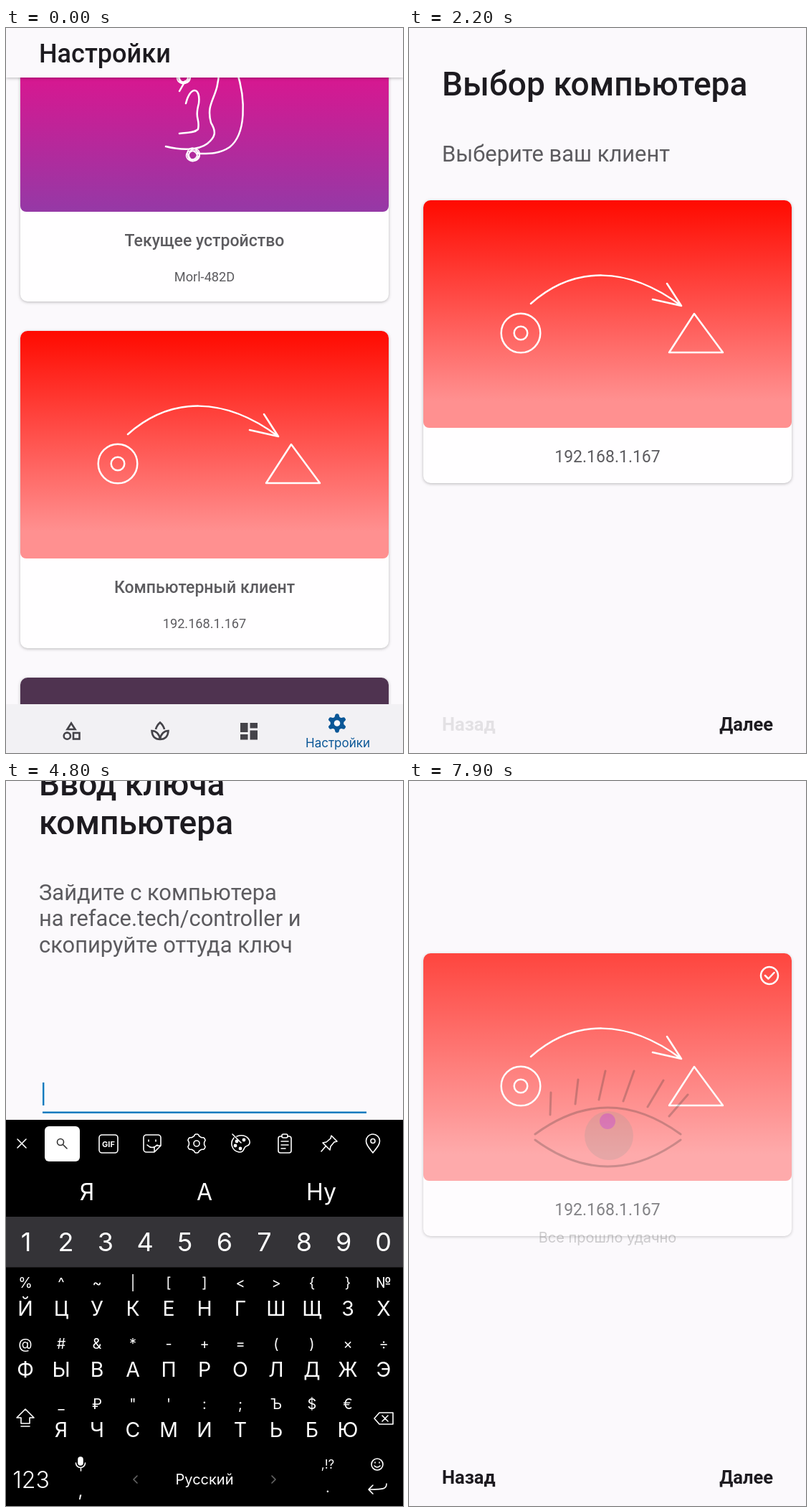
Recreate the animation shown at these times as an HTML page. Size 554 by 1010 pixels, loop 8000 ms.

```html
<!DOCTYPE html>
<html lang="ru">
<head>
<meta charset="utf-8">
<style>
html, body { margin: 0; width: 100%; height: 100%; overflow: hidden; background: #000; }
svg { display: block; width: 554px; height: 1010px; font-family: Roboto, "Noto Sans", sans-serif; }
.soft { font-family: Inter, "Noto Sans", sans-serif; }
.mid { text-anchor: middle; }
.end { text-anchor: end; }
.med { font-weight: 500; }
.bold { font-weight: 700; }
.light { font-weight: 300; }
.line { fill: none; stroke: #fff; stroke-width: 2.5; stroke-linecap: round; stroke-linejoin: round; }
.thin { stroke-width: 1.6; }
.card { filter: drop-shadow(0 1px 2px #0004); }
</style>
</head>
<body>
<script>
const text = (x, y, size, str, cls = '', fill = '#5c5b5f', more = '') =>
  `<text x="${x}" y="${y}" font-size="${size}" class="${cls}" fill="${fill}" ${more}>${str}</text>`;
const rect = (x, y, w, h, fill, r = 0, more = '') =>
  `<rect x="${x}" y="${y}" width="${w}" height="${h}" rx="${r}" fill="${fill}" ${more}/>`;
const circle = (x, y, r, more = '') => `<circle cx="${x}" cy="${y}" r="${r}" ${more}/>`;
const path = (d, more = '') => `<path d="${d}" ${more}/>`;
const group = (id, body, more = '') => `<g id="${id}" ${more}>${body}</g>`;

// Six-toothed outline shared by both settings icons
function gear(x, y, r, tooth, more) {
  let d = '';
  for (let i = 0; i < 72; i++) {
    const a = i * Math.PI / 36, q = r - tooth * Math.max(-1, Math.min(1, 1.6 * Math.cos(6 * a)));
    d += `${i ? 'L' : 'M'}${(x + q * Math.cos(a)).toFixed(1)} ${(y + q * Math.sin(a)).toFixed(1)}`;
  }
  return path(d + 'Z', more);
}

const BG = '#fbf9fc', INK = '#1d1b20', BLUE = '#0c7bbf';

const clientArt = `<g class="line">${circle(156, 185, 27.3)}${circle(156, 185, 9.3)}
  ${path('M398 158L438 212H363Z')}
  ${path('M170 144C230 91 305 91 380 147M360 116L380 147L340 138')}</g>`;

const card = (y, h, fill, body) => `<g transform="translate(0 ${y})">
  ${rect(20, 0, 514, h, '#fffeff', 10, 'class="card"')}
  ${path('M20 10a10 10 0 0 1 10-10H524a10 10 0 0 1 10 10V309a8 8 0 0 1-8 8H28a8 8 0 0 1-8-8Z', `fill="${fill}"`)}
  ${body}</g>`;

const labels = (title, sub) =>
  text(277, 365, 23, title, 'mid med') + text(277, 413.5, 18.2, sub, 'mid');

const knot = (x, y) => [0, 1, 2, 3].map(i =>
  `<ellipse cx="${x - 3 + i * 2}" cy="${y - 2 + i * 1.5}" rx="7" ry="8" transform="rotate(${i * 40} ${x} ${y})"/>`).join('');

const ear = `<g class="line" transform="translate(0 61)" stroke-width="2.2">
  ${path('M250 74L242 88M251 105C257 80 272 82 269 105C263 128 271 126 268 141C262 147 252 145 242 147')}
  ${path('M297 60C297 98 278 102 286 132C294 145 292 152 281 161C268 171 243 170 223 165')}
  ${path('M322 60C335 100 335 148 312 166C297 176 282 175 268 175')}
  <g stroke-width="1.6">${knot(250, 69)}${knot(263, 177)}</g></g>`;

const nav = rect(0, 942, 554, 73, '#f2f1f4') +
  `<g fill="none" stroke="#444349" stroke-width="2.6">
    ${path('M91 968.5L85.5 977H96.5Z')}${circle(85.3, 986.2, 4.6)}${rect(94, 982, 8.5, 8.5, 'none')}
    ${path('M215 991C214 983 209 979 203.500 979C204 987 208 991 215 991C222 991 226 987 226.500 979C221 979 216 983 215 991M209 977C210 973 212 970 215 967.500C218 970 220 973 221 977')}
  </g>` +
  path('M327 968h10.500v13h-10.500zM327 984h10.500v7.500h-10.500zM340.500 978.500h10.500v13h-10.500zM340.500 968h10.500v7.500h-10.500z', 'fill="#444349"') +
  gear(462, 968.5, 11.2, 2, 'fill="#0a5797"') + circle(462, 968.5, 4.3, `fill="${BG}"`) +
  text(463, 1002, 17, 'Настройки', 'mid soft', '#0a5797');

const settings = rect(0, 0, 554, 1050, BG) +
  card(-61, 442, 'url(#violet)', ear + labels('Текущее устройство', 'Morl-482D')) +
  card(422, 442, 'url(#red)', clientArt + labels('Компьютерный клиент', '192.168.1.167')) +
  card(905, 442, '#4f3350', '') +
  rect(0, 0, 554, 69, BG, 0, 'class="card"') +
  text(46, 48, 36, 'Настройки', 'med', INK) + nav;

const check = group('check', circle(503, 31, 12) + path('M497 31L501.500 35.500L509.500 27'), 'class="line"');

const pickPage =
  group('pickHead', text(46, 94, 46, 'Выбор компьютера', 'med', INK) +
    text(46, 185.5, 30.9, 'Выберите ваш клиент')) +
  group('pickCard', card(240, 394, 'url(#red)', clientArt + check +
    text(277, 365, 23, '192.168.1.167', 'mid')));

const keyPage = group('keyPage',
  text(46, 94, 46, 'Ввод ключа', 'med', INK) + text(46, 148, 46, 'компьютера', 'med', INK) +
  ['Зайдите с компьютера', 'на reface.tech/controller и', 'скопируйте оттуда ключ']
    .map((s, i) => text(46, 240 + 36.4 * i, 30.9, s)).join('') +
  text(51, 518, 21.7, '', 'soft', INK, 'id="typed"') +
  rect(51, 522, 0, 1.6, INK, 0, 'id="under"') +
  rect(51, 494, 2.4, 32, BLUE, 0, 'id="caret"') +
  rect(51, 534.5, 452, 1.6, '#8a888c', 0, 'id="rule"'));

const eye = group('eye', `<g fill="none" stroke="#333" stroke-width="3" stroke-linecap="round">
  ${circle(279, 494, 34, 'fill="#a09c98" stroke="none"')}
  ${path('M176 492Q277 418 379 492M176 500Q277 574 379 500')}
  ${path('M198 434L197 465M236 416L232 450M274 404L265 444M314 404L299 446M355 417L333 454M389 437L363 467')}
  ${circle(277, 474, 11, 'fill="#6a10ff" stroke="none"')}</g>` +
  text(277, 643, 20, 'Все прошло удачно', 'mid soft', '#444'));

const buttons = text(46, 979, 25.5, 'Назад', 'bold', INK, 'id="back"') +
  text(508, 979, 25.5, 'Далее', 'bold end', INK);

const ROWS = ['йцукенгшщзх', 'фывапролджэ', ' ячсмитьбю '];
const HINTS = [
  ['%', '^', '~', '|', '[', ']', '&lt;', '&gt;', '{', '}', '№'],
  ['@', '#', '&amp;', '*', '-', '+', '=', '(', ')', '×', '÷'],
  ['', '_', '₽', '"', "'", ':', ';', 'ъ', '$', '€', '']];
const STEP = 84.5, keyX = i => 27 + 50 * i;
const keyText = (x, y, size, s, cls = '') => text(x, y, size, s, 'mid soft ' + cls, '#fff');

const letters = change => ROWS.map((row, r) => [...row].map((c, i) =>
  keyText(keyX(i), 706 + STEP * r, 20, HINTS[r][i] === 'ъ' ? change('ъ') : HINTS[r][i]) +
  keyText(keyX(i), 745 + STEP * r, 28.5, change(c))).join('')).join('');

const toolbar = rect(54, 481, 49, 49, '#fff', 6) +
  `<g class="line thin">
    ${path('M16 499L28 511M28 499L16 511')}
    <g stroke="#333">${circle(76, 503, 4.5)}${path('M79.500 506.500L85 512')}</g>
    ${rect(130, 493, 26, 25, 'none', 4)}
    ${path('M196 493h16a4 4 0 0 1 4 4v11l-9 9h-11a4 4 0 0 1-4-4v-16a4 4 0 0 1 4-4M216 508h-5a4 4 0 0 0-4 4v5M197 507q7 7 14 0M199 500v2M209 500v2')}
    ${gear(266, 505, 11.8, 1.2)}${circle(266, 505, 4)}
    ${path('M322 495C337 490 345 504 337 508C330 509 334 518 325 517C315 515 312 504 318 497M316 492L328 504')}
    ${[[322, 502], [332, 500], [320, 508], [327, 512]].map(p => circle(...p, 1.6, 'fill="#fff"')).join('')}
    ${rect(380, 495, 18, 23, 'none', 3)}${rect(385, 492, 8, 5, '#000', 2)}${path('M384 502h10M384 507h10M384 512h6')}
    ${path('M454 494L462 502L458 503L453 509L452 514L442 504L447 503L453 498ZM446 509L440 516')}
    ${path('M512 518C505 509 502.500 506 502.500 501.500a9.500 9.500 0 0 1 19 0C521.500 506 519 509 512 518Z')}${circle(512, 501.5, 3)}
  </g>` + text(143, 509.5, 11, 'GIF', 'mid soft bold', '#fff');

const bottomRow = keyText(35, 984.5, 32, '123', 'light') + keyText(104, 997, 24, ',') +
  keyText(277, 980, 20, 'Русский') + keyText(449, 958, 17, ',!?') + keyText(449, 991, 20, '.') +
  `<g class="line thin">
    ${rect(101, 942, 6, 11, '#fff', 3)}${path('M97.500 950a6.500 6.500 0 0 0 13 0M104.500 957v4')}
    ${path('M183 968L178 973L183 978M371 968L376 973L371 978', 'stroke="#666"')}
    ${path('M27 875L39 887H33V895H21V887H15ZM21 899H33')}
    ${path('M514 888L521 880H540V896H521ZM525 884L533 892M533 884L525 892')}
    ${circle(518, 952, 8)}${path('M514 954q4 4 8 0M515 949v1M521 949v1')}
    ${path('M531 979C531 986 528 987 506 987M512 981L506 987L512 993')}
  </g>`;

const keyboard = group('keyboard', rect(0, 472, 554, 560, '#000') + toolbar +
  [113, 277, 440].map((x, i) => text(x, 583.5, 30, '', 'mid soft', '#fff', `id="hint${i}"`)).join('') +
  rect(0, 607, 554, 70.5, '#343337') +
  [...'1234567890'].map((c, i) => keyText(28 + 55.4 * i, 655, 36, c)).join('') +
  group('upper', letters(c => c.toUpperCase())) + group('lower', letters(c => c)) + bottomRow +
  group('popup', rect(-24.5, 0, 49.5, 169, '#fff', 6) +
    text(0, 59, 44, '', 'mid soft med', '#111', 'id="popKey"')));

document.body.innerHTML = `<svg viewBox="0 0 554 1010"><defs>
  <linearGradient id="red" x2="0" y2="1"><stop stop-color="#ff0a00"/><stop offset=".88" stop-color="#ff9090"/></linearGradient>
  <linearGradient id="violet" x2="0" y2="1"><stop offset=".4" stop-color="#d81790"/><stop offset="1" stop-color="#9539a6"/></linearGradient>
  <clipPath id="reveal"><rect id="edge" width="554" height="1100"/></clipPath></defs>
  ${group('settings', settings + rect(0, 0, 554, 1050, '#000', 0, 'id="dim"'))}
  <g clip-path="url(#reveal)">${group('sheet', rect(0, -60, 554, 1076, BG) + pickPage + keyPage + eye + buttons)}</g>
  ${keyboard}</svg>`;

const el = {};
document.querySelectorAll('[id]').forEach(e => el[e.id] = e);
const set = (id, attrs) => { for (const k in attrs) el[id].setAttribute(k, attrs[k]); };
const show = (id, on) => set(id, { display: on ? 'inline' : 'none' });
const ramp = (t, a, b) => Math.max(0, Math.min(1, (t - a) / (b - a)));
const out = (p, k) => 1 - (1 - p) ** k;
const smooth = p => p * p * (3 - 2 * p);

const WORD = 'Привет', PRESS = [4950, 5350, 5650, 5950, 6250, 6550], FOCUS = 3800;
const suggest = n => n === 0 ? ['Я', 'А', 'Ну'] : n < 3 ? ['Пока', 'При', 'Привет'] : ['Привет', 'При', 'При этом'];

function typing(t) {
  const count = PRESS.filter(p => p <= t).length;
  const last = count ? PRESS[count - 1] : FOCUS;
  el.typed.textContent = WORD.slice(0, count);
  const width = count ? el.typed.getComputedTextLength() : 0;
  set('under', { width });
  set('caret', { x: 51 + width });
  show('caret', t >= FOCUS && (t - last) % 1000 < 500);
  set('rule', t < FOCUS ? { fill: '#8a888c', height: 1.6 } : { fill: BLUE, height: 2.5 });
  show('upper', !count);
  show('lower', count);
  suggest(count).forEach((s, i) => {
    el['hint' + i].textContent = s;
    set('hint' + i, {
      'font-size': s.length < 4 ? 32 : s.length < 7 ? 28.6 : 23.4,
      fill: t < 4200 ? '#888' : '#fff'
    });
  });
  const pressed = count > 0 && t - last < 130;
  show('popup', pressed);
  if (pressed) {
    const key = WORD[count - 1], low = key.toLowerCase();
    const row = ROWS.findIndex(r => r.includes(low));
    el.popKey.textContent = key;
    set('popup', { transform: `translate(${keyX(ROWS[row].indexOf(low))} ${678 + STEP * (row - 1)})` });
  }
}

function draw(t) {
  const open = ramp(t, 1050, 1500);
  show('settings', open < 1);
  set('settings', { transform: `translate(0 ${-20 * out(open, 2.84)})` });
  set('dim', { opacity: .15 * out(open, 2.84) });
  set('edge', { y: 1010 * (1 - out(open, 4.4)) });

  // The keyboard slides in and pans the window up
  const rise = ramp(t, 3855, 4155), fall = ramp(t, 6765, 7065);
  const pan = -74 * (smooth(rise) - smooth(fall));
  set('sheet', { transform: `translate(0 ${41 * (1 - out(open, 1.75)) + pan})` });
  show('keyboard', rise > 0 && fall < 1);
  set('keyboard', {
    transform: `translate(0 ${504 * (1 - out(rise, 3) + fall ** 3)})`,
    opacity: Math.max(0, Math.min(1, rise * 1.3) - fall * 1.3)
  });

  const toKey = ramp(t, 2750, 2980), toPick = ramp(t, 7250, 7450), done = ramp(t, 7800, 8200);
  const pick = 1 - toKey + toPick;
  set('pickHead', { opacity: pick - ramp(t, 7680, 7800) });
  set('pickCard', { opacity: pick - done });
  set('check', { opacity: ramp(t, 7480, 7600) });
  set('keyPage', { opacity: toKey - toPick });
  set('eye', { opacity: done });
  set('back', { opacity: .1 + .9 * Math.max(toKey - toPick, ramp(t, 7680, 7780)) });
  typing(t);
}

function loop() {
  draw(performance.now() % 8000);
  requestAnimationFrame(loop);
}
loop();
</script>
</body>
</html>
```
